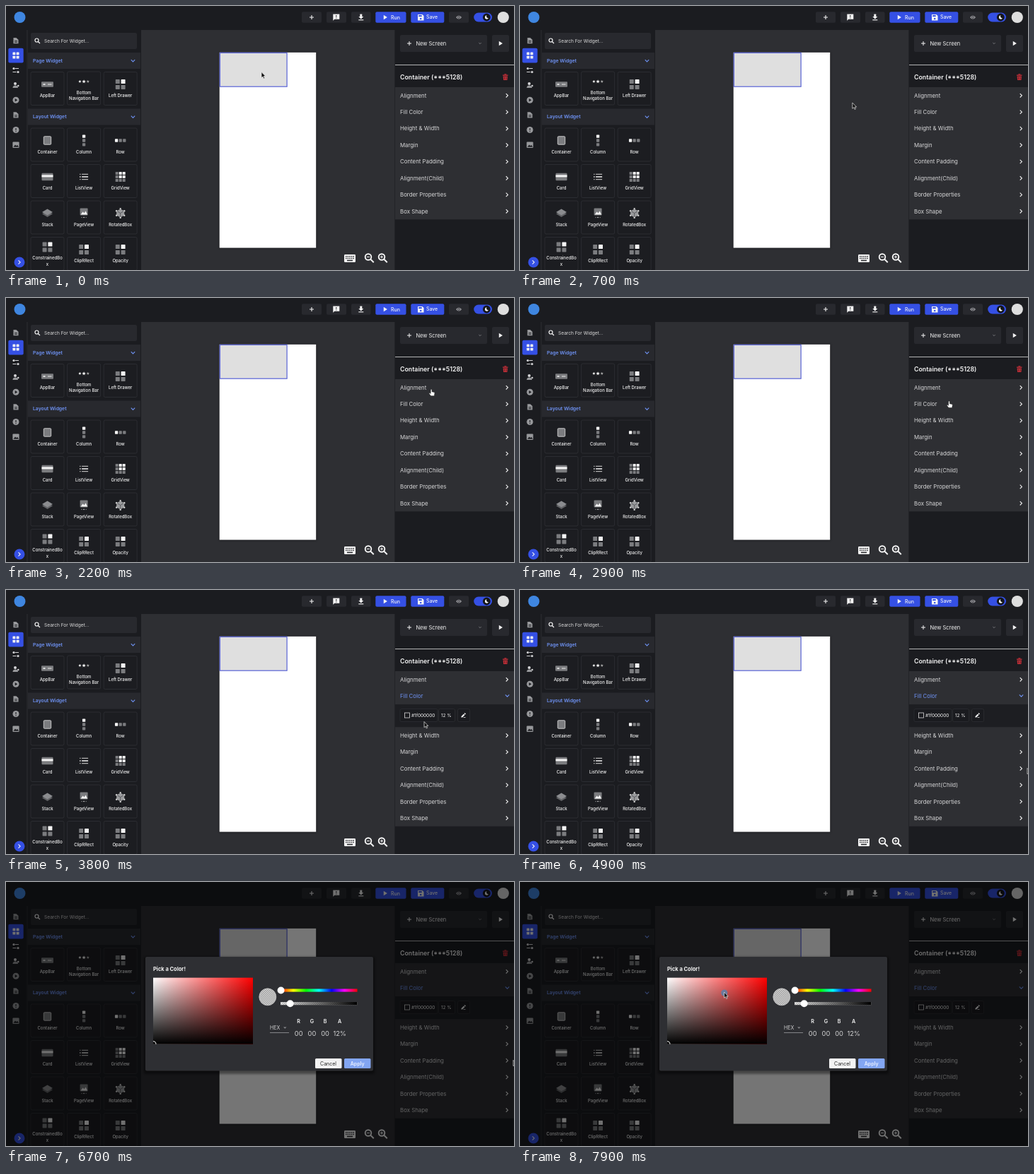
An HTML page that plays this animation: 718x374 px, repeating every 8000 ms.

```html
<!DOCTYPE html>
<html lang="en">
<head>
<meta charset="utf-8">
<title>Widget builder</title>
<style>
html, body { margin: 0; width: 100%; height: 100%; overflow: hidden; background: #1b1c20; }
svg { display: block; width: 718px; height: 374px; font-family: Inter, "Open Sans", sans-serif; }
</style>
</head>
<body>
<svg id="stage" viewBox="0 0 718 374" xmlns="http://www.w3.org/2000/svg"></svg>
<script>
const DARK = '#1b1c20', MID = '#2e2f33', BAR = '#28292e', BLUE = '#3550e4', LINK = '#6f93f5', GRAY = '#7b7c7f', WHITE = '#f4f4f4';

// markup helpers
const rect = (x, y, w, h, fill, r = 0, extra = '') =>
  `<rect x="${x}" y="${y}" width="${w}" height="${h}" rx="${r}" fill="${fill}" ${extra}/>`;
const circle = (x, y, r, fill, extra = '') => `<circle cx="${x}" cy="${y}" r="${r}" fill="${fill}" ${extra}/>`;
const shape = (d, fill, extra = '') => `<path d="${d}" fill="${fill}" ${extra}/>`;
const line = (d, color = WHITE, w = 1.2) =>
  `<path d="${d}" fill="none" stroke="${color}" stroke-width="${w}"/>`;
const text = (x, cy, s, size, fill = WHITE, weight = 400, anchor = 'start') =>
  `<text x="${x}" y="${cy + size * 0.36}" font-size="${size}" fill="${fill}" font-weight="${weight}" text-anchor="${anchor}">${s}</text>`;
const mid = (x, cy, s, size, fill, weight) => text(x, cy, s, size, fill, weight, 'middle');
const right = (x, y, c = WHITE) => line(`M${x - 1.8} ${y - 2.7}l2.700 2.700l-2.700 2.700`, c, 1.1);
const down = (x, y, c = LINK) => line(`M${x - 2.7} ${y - 1.3}l2.700 2.700l2.700 -2.700`, c, 1.1);
const play = (x, y, s) => shape(`M${x - s * 0.7} ${y - s}l${s * 1.6} ${s}l${-s * 1.6} ${s}z`, WHITE);
const pencil = (x, y) => shape(`M${x - 3} ${y + 1.5}l3.5 -3.5l1.5 1.5l-3.5 3.5h-1.500z`, WHITE) +
  line(`M${x} ${y + 3}h3`, WHITE, 0.7) + shape(`M${x + 1} ${y - 2.6}l1 -1l1.500 1.500l-1 1z`, WHITE);
const lens = (x, y, r, w) => line(`M${x - r} ${y}a${r} ${r} 0 1 1 ${2 * r} 0a${r} ${r} 0 1 1 ${-2 * r} 0M${x + r * 0.7} ${y + r * 0.7}l${r * 1.1} ${r * 1.1}`, WHITE, w);

function cells(x, y, cols, rows, size, gap, lit) {
  let s = '';
  for (let i = 0; i < cols * rows; i++) {
    s += rect(x + (i % cols - (cols - 1) / 2) * (size + gap) - size / 2,
      y + (Math.floor(i / cols) - (rows - 1) / 2) * (size + gap) - size / 2,
      size, size, lit.includes(i) ? WHITE : GRAY, 0.6);
  }
  return s;
}

function star(x, y, r, fill) {
  let p = '';
  for (let i = 0; i < 10; i++) {
    const a = i * Math.PI / 5 - Math.PI / 2, q = i % 2 ? r * 0.45 : r;
    p += `${i ? 'L' : 'M'}${(x + q * Math.cos(a)).toFixed(2)} ${(y + q * Math.sin(a)).toFixed(2)}`;
  }
  return shape(p + 'z', fill);
}

const icons = {
  appbar: (x, y) => rect(x - 8.5, y - 3.8, 17, 7.6, GRAY, 1) + rect(x - 6, y - 0.8, 3, 1.6, WHITE) + rect(x + 0.5, y - 0.8, 5.5, 1.6, '#c4c4c4'),
  stars: (x, y) => star(x - 5.7, y, 2.3, WHITE) + star(x, y, 2.8, WHITE) + star(x + 5.7, y, 2.3, '#a8a8a8'),
  quad: (x, y) => cells(x, y, 2, 2, 6, 1.8, [1]),
  box: (x, y) => rect(x - 5.2, y - 5.7, 10.4, 11.4, GRAY, 1, 'stroke="#c9c9c9" stroke-width="1"'),
  column: (x, y) => cells(x, y, 1, 3, 4.3, 1.5, [0]),
  row: (x, y) => cells(x, y, 3, 1, 4.3, 1.3, [0]),
  card: (x, y) => rect(x - 8, y - 5.3, 16, 10.6, GRAY, 1) + rect(x - 8, y - 2.6, 16, 3, WHITE),
  list: (x, y) => [-3.6, 0, 3.6].map(d => line(`M${x - 6} ${y + d}h1.5M${x - 3} ${y + d}h9`, d ? '#b5b5b5' : WHITE, 1.3)).join(''),
  grid: (x, y) => cells(x, y, 3, 3, 4, 1, [1, 2, 4, 5]),
  stack: (x, y) => shape(`M${x} ${y - 3.5}l7.500 4.500l-7.500 4.500l-7.500 -4.500z`, '#626366') + shape(`M${x} ${y - 6}l7.500 4.500l-7.500 4.500l-7.500 -4.500z`, '#8b8c8f'),
  page: (x, y) => rect(x - 5.5, y - 7, 11, 10, GRAY, 1) + shape(`M${x - 4.5} ${y + 2}l3 -4l2 2l2 -3l2.500 5z`, WHITE) +
    [-3, 0, 3].map(d => circle(x + d, y + 6, 0.8, d ? GRAY : WHITE)).join(''),
  cube: (x, y) => shape(`M${x} ${y - 6}l5.500 3v6l-5.500 3l-5.500 -3v-6z`, '#9a9b9d') +
    line(`M${x - 5} ${y - 3}l5 3l5 -3M${x} ${y}v6`, '#4a4b4f', 0.8) +
    [0, 1, 2, 3, 4, 5].map(i => circle(x + 6.4 * Math.sin(i * Math.PI / 3), y - 6.4 * Math.cos(i * Math.PI / 3), 1.2, '#d0d0d0')).join('')
};

function card(col, top, icon, ...label) {
  const x = 35 + col * 51.6, cx = x + 23.5, two = label.length > 1;
  const iy = top + (two ? 14 : 17.5);
  return rect(x, top, 47, 47, '#1c1d21', 2, 'stroke="#303136" stroke-width=".8"') + icons[icon](cx, iy) +
    label.map((s, i) => mid(cx, top + (two ? 29.8 + i * 8.4 : 33.8), s, 6, WHITE, 500)).join('');
}

function topBar() {
  const btn = (x, w, fill) => rect(x, 8.2, w, 15.6, fill, 2);
  return rect(0, 0, 718, 34, DARK) + circle(19.5, 16, 8, '#3f86e0') +
    btn(418, 28, BAR) + line('M432 13v6M429 16h6', WHITE, 1.1) +
    btn(453, 28, BAR) + shape('M462.300 11.500h9v7.200h-7l-2 2z', WHITE) + line('M466.800 13v2.500M466.800 16.500v1', DARK, 1) +
    btn(488, 27.5, BAR) + shape('M500.300 11.500h3v3.500h2l-3.500 3.600l-3.500 -3.600h2z', WHITE) + line('M498.300 19.800h7', WHITE, 1.1) +
    btn(522.3, 43.2, BLUE) + play(536, 16, 3.2) + text(544, 16, 'Run', 7, WHITE, 500) +
    btn(572.3, 47, BLUE) + shape('M582 12h6.500l2 2v6.500h-8.500z', WHITE) + rect(583.2, 13, 4.5, 2, BLUE) + circle(586.2, 18, 1.2, BLUE) + text(594, 16, 'Save', 6.9, WHITE, 500) +
    btn(626, 28, BAR) + shape('M636 16q4 -5 8 0q-4 5 -8 0z', '#9b9ca0') + circle(640, 16, 1.8, BAR) + circle(640, 16, 1, '#9b9ca0') +
    rect(661.2, 9.5, 25.8, 13, BLUE, 6.5) + circle(679.3, 16, 5.4, '#15161a') + shape('M679.500 13.300a2.700 2.700 0 1 0 2.500 3.800a2.400 2.400 0 0 1 -2.500 -3.800z', WHITE) +
    circle(702.8, 16, 8.1, '#dedede');
}

function sideBar() {
  const c = '#98999c', lit = '#d5d5d7';
  const sheet = y => shape(`M10.500 ${y - 4}h4l3 2.700v5.500h-7z`, c) + line(`M12.200 ${y + 0.5}h3.600M12.200 ${y + 2.4}h3.600`, DARK, 0.9);
  return rect(0, 34, 30, 340, DARK) + rect(29.5, 34, 1, 340, MID) + sheet(49) +
    rect(3.3, 59.8, 21.4, 20.7, BLUE, 2) + cells(14, 70, 2, 2, 3.8, 1.4, [0, 1, 2, 3]) +
    line('M13 88.500h5M9.500 93.500h5', lit, 1.2) + circle(11, 88.5, 1.6, lit) + circle(17, 93.5, 1.6, lit) +
    circle(13, 110, 2, lit) + shape('M9.500 116q0 -3.500 3.700 -3.500q3.800 0 3.800 3.500z', c) + circle(17.3, 113, 1.2, lit) +
    circle(14, 133.2, 4.5, c) + shape('M12.700 131l3.500 2.200l-3.500 2.200z', DARK) + sheet(154.3) +
    circle(14, 175.5, 4.5, c) + line('M14 173v3.300M14 177.200v1.200', DARK, 1.1) +
    rect(9.4, 192.6, 9.2, 8.4, c, 1) + shape('M10.500 199.800l2.500 -3.400l1.700 1.900l1.300 -1.500l2 3z', DARK) +
    circle(19, 363, 7.5, BLUE) + right(19.3, 363);
}

function widgetPanel() {
  const head = (y, s) => rect(31, y - 11.5, 159, 23, BAR) + text(38, y, s, 6.8, LINK, 600) + down(179.5, y);
  return rect(30.5, 34, 160.5, 340, DARK) + rect(35, 38, 150, 23, BAR, 2) + lens(43.5, 48.5, 2.5, 1.2) +
    text(54, 49.3, 'Search For Widget...', 6.6, '#dcdcdc') + head(77.5, 'Page Widget') + head(157, 'Layout Widget') +
    card(0, 93.5, 'appbar', 'AppBar') + card(1, 93, 'stars', 'Bottom', 'Navigation Bar') + card(2, 93.5, 'quad', 'Left Drawer') +
    card(0, 173, 'box', 'Container') + card(1, 173, 'column', 'Column') + card(2, 173, 'row', 'Row') +
    card(0, 224.5, 'card', 'Card') + card(1, 224.5, 'list', 'ListView') + card(2, 224.5, 'grid', 'GridView') +
    card(0, 276, 'stack', 'Stack') + card(1, 276, 'page', 'PageView') + card(2, 276, 'cube', 'RotatedBox') +
    card(0, 327.5, 'quad', 'ConstrainedBo', 'x') + card(1, 327.5, 'quad', 'ClipRRect') + card(2, 327.5, 'quad', 'Opacity');
}

function canvasArea() {
  let keys = '';
  for (let i = 0; i < 10; i++) keys += rect(480 + (i % 5) * 2.6, 354 + Math.floor(i / 5) * 2.7, 1.5, 1.5, MID);
  return rect(190.5, 34, 359, 340, MID) + rect(190, 34, 1, 340, '#222327') + rect(549, 34, 1, 340, '#222327') +
    rect(301, 65.5, 138, 278, '#000', 1, 'opacity=".35" filter="url(#soft)"') + rect(301.7, 65.8, 136.5, 276.8, '#fff') +
    rect(302.4, 66.4, 94.7, 47.8, '#dfdfdf', 0, 'stroke="#5862d6" stroke-width="1.2"') +
    rect(478, 352, 16, 11, WHITE, 1.2) + keys + rect(482, 359.7, 8, 1.6, MID) +
    lens(512, 355.5, 4.3, 1.9) + line('M510 355.500h4', WHITE, 1.1) +
    lens(531, 355.5, 4.3, 1.9) + line('M529 355.500h4M531 353.500v4', WHITE, 1.1);
}

const names = ['Alignment', 'Fill Color', 'Height &amp; Width', 'Margin', 'Content Padding', 'Alignment(Child)', 'Border Properties', 'Box Shape'];
const rowY = i => 126.8 + i * 23.43;
const row = i => text(557, rowY(i), names[i], 7.85, '#d8d8d9') + right(708.5, rowY(i));

function propPanel() {
  return rect(550, 34, 168, 340, DARK) + rect(557, 41, 123, 24, BAR, 2) + line('M570 50v6M567 53h6', WHITE, 1) +
    text(579.5, 53, 'New Screen', 7.45, WHITE) + line('M668.300 52l1.700 1.700l1.700 -1.700', '#8b8c8f', 0.8) +
    rect(687, 41, 24, 24, BAR, 2) + play(699, 53, 3.2) + rect(550, 83, 168, 1, '#b4b4b5') +
    text(557, 101, 'Container (***5128)', 8.8, WHITE, 600) +
    shape('M702 97.500h7.500v1.200h-7.500zM704.300 96.300h3v1h-3zM702.600 99.500h6.300l-.5 5.500h-5.300z', '#c92f38') + line('M704.500 100.300v3.800M707 100.300v3.800', DARK, 0.6) +
    rect(550, 115, 168, 47, MID) + row(0) +
    '<g id="fillText">' + text(557, rowY(1), names[1], 7.85, 'currentColor') + '</g>' +
    '<g id="arrow">' + right(0, 0, 'currentColor') + '</g>' +
    '<g id="body">' + rect(550, 162, 168, 32.4, '#1d1e22') +
    [[557, 53], [611.5, 23], [638.5, 17]].map(b => rect(b[0], 168.5, b[1], 18, '#1a1b1f', 2, 'stroke="#303136" stroke-width=".7"')).join('') +
    rect(563.5, 174, 7, 7, 'none', 0, 'stroke="#d8d8d8" stroke-width=".8"') +
    text(573, 177.5, '#1f000000', 6.4, WHITE, 400) + mid(622.3, 177.5, '12 %', 6.4, WHITE) + pencil(646.5, 177.5) + '</g>' +
    '<g id="rest">' + rect(550, 161.8, 168, 140.6, MID) + [2, 3, 4, 5, 6, 7].map(row).join('') + '</g>';
}

function dialog() {
  const chans = [['R', '00', 413.7], ['G', '00', 432.4], ['B', '00', 451], ['A', '12%', 471.7]];
  return '<g id="dialog">' + rect(0, 0, 718, 374, '#000', 0, 'opacity=".54"') +
    rect(195, 106, 326, 166, '#000', 3, 'opacity=".4" filter="url(#soft)"') + rect(197, 106, 322, 161.5, MID, 2) +
    text(208, 123.2, 'Pick a Color!', 7.5, WHITE, 700) +
    rect(208, 135.6, 141, 94.2, 'url(#sat)') + rect(208, 135.6, 141, 94.2, 'url(#dark)') +
    line('M208 225.700a4 4 0 0 1 4 4', WHITE, 1.1) +
    circle(369.8, 162.8, 12, 'url(#check)') + circle(369.8, 162.8, 12, '#000', 'fill-opacity=".12" stroke="#d5d5d5" stroke-width=".7"') +
    rect(388, 151.4, 108.5, 4.2, 'url(#hue)') + circle(388.6, 153.5, 5, '#fff') +
    rect(388, 170, 108.5, 4.2, 'url(#check)') + rect(388, 170, 108.5, 4.2, 'url(#fade)') + circle(401.6, 172.2, 5, '#fff') +
    text(373, 206.5, 'HEX', 7, '#d2d2d3') + shape('M392 205.500h4.500l-2.250 2.200z', '#8b8c8f') + rect(373, 213, 27, 0.8, '#9a9b9e') +
    chans.map(c => mid(c[2], 197.2, c[0], 7.2, WHITE, 600) + mid(c[2], 214.2, c[1], 9.3, '#d2d2d3')).join('') +
    rect(437, 250, 37.5, 14, '#f3f3f3', 1.5) + mid(455.5, 257, 'Cancel', 7, '#222') +
    rect(478, 250, 37.5, 14, '#83a6f2', 1.5) + mid(496.7, 257, 'Apply', 7, '#e9effd', 600) + '</g>';
}

const stop = (o, c, a = 1) => `<stop offset="${o}" stop-color="${c}" stop-opacity="${a}"/>`;
const hues = [0, 1, 2, 3, 4, 5, 6].map(i => stop(i / 6, `hsl(${i * 60},100%,50%)`)).join('');
const defs = `<defs><filter id="soft" x="-10%" y="-10%" width="120%" height="120%"><feGaussianBlur stdDeviation="1.6"/></filter>
<linearGradient id="sat">${stop(0, '#fff')}${stop(1, '#f00')}</linearGradient>
<linearGradient id="dark" x2="0" y2="1">${stop(0, '#000', 0)}${stop(1, '#000')}</linearGradient>
<linearGradient id="hue">${hues}</linearGradient>
<linearGradient id="fade">${stop(0, '#000', 0)}${stop(1, '#000')}</linearGradient>
<pattern id="check" width="3" height="3" patternUnits="userSpaceOnUse">${rect(0, 0, 3, 3, '#f2f2f2')}${rect(0, 0, 1.5, 1.5, '#b4b4b4')}${rect(1.5, 1.5, 1.5, 1.5, '#b4b4b4')}</pattern></defs>`;

const pointer = '<g id="halo">' + circle(0.3, 1, 4.6, '#4f86b5', 'opacity=".75"') + '</g><g id="pointer">' +
  shape('M0 0v8.200l1.900 -1.700l1.300 2.900l1.400 -.6l-1.300 -2.800h2.500z', '#111', 'stroke="#eee" stroke-width=".7"') + '</g><g id="hand">' +
  shape('M-.9 .7q.9 -1.300 1.800 0v3l3.200 .8q.9 .4 .7 1.500l-.7 3.600h-4.600l-2.700 -3.400q.6 -1.400 2.300 .1z', '#fff', 'stroke="#222" stroke-width=".5"') + '</g>';

const $ = id => document.getElementById(id);
$('stage').innerHTML = defs + canvasArea() + widgetPanel() + sideBar() + topBar() + propPanel() + dialog() + pointer;

// pointer stops: time, x, y
const path = [[0, 361, 93.5], [300, 361, 93.5], [1200, 622, 198], [1400, 616, 162.5], [1900, 602, 130], [2100, 602, 130],
  [2400, 598.5, 126.5], [2500, 598.5, 126.5], [2900, 606.5, 146], [3200, 606.5, 146], [3400, 606, 149], [3600, 600, 180],
  [3700, 600, 180], [3800, 591, 186.5], [4200, 564, 176], [4400, 564, 176], [4900, 717, 252.5],
  [6700, 717, 252.5], [7500, 298, 166], [7900, 288.5, 156], [8000, 288.5, 156]];
const smooth = p => p * p * (3 - 2 * p);
const ramp = (t, a, b) => smooth(Math.min(1, Math.max(0, (t - a) / (b - a))));

function position(t) {
  const i = path.findIndex((k, n) => n && t < k[0]);
  const a = path[i - 1], b = path[i], p = ramp(t, a[0], b[0]);
  return [a[1] + (b[1] - a[1]) * p, a[2] + (b[2] - a[2]) * p];
}

const show = (id, on) => $(id).setAttribute('display', on ? 'inline' : 'none');
const move = (id, x, y, turn = 0) => $(id).setAttribute('transform', `translate(${x} ${y}) rotate(${turn})`);

function draw(t) {
  const open = ramp(t, 3200, 3600), drop = 32.4 * open;
  const [x, y] = position(t);
  move('rest', 0, drop);
  move('arrow', 708.5, rowY(1), 90 * open);
  $('fillText').style.color = open > 0 ? LINK : '#d8d8d9';
  $('arrow').style.color = open > 0 ? LINK : WHITE;
  show('body', open > 0);
  show('dialog', t >= 6700);
  const inBody = y > 162 && y < 162 + drop;
  const hand = t < 6700 && x > 550 && x < 715 && y > 115 && y < 302 + drop && !inBody;
  show('hand', hand);
  show('pointer', !hand);
  show('halo', t >= 7800);
  for (const id of ['hand', 'pointer', 'halo']) move(id, x, y);
}

// the picture advances ten times a second
function tick() {
  draw(Math.floor(performance.now() % 8000 / 100) * 100);
  requestAnimationFrame(tick);
}
tick();
</script>
</body>
</html>
```
